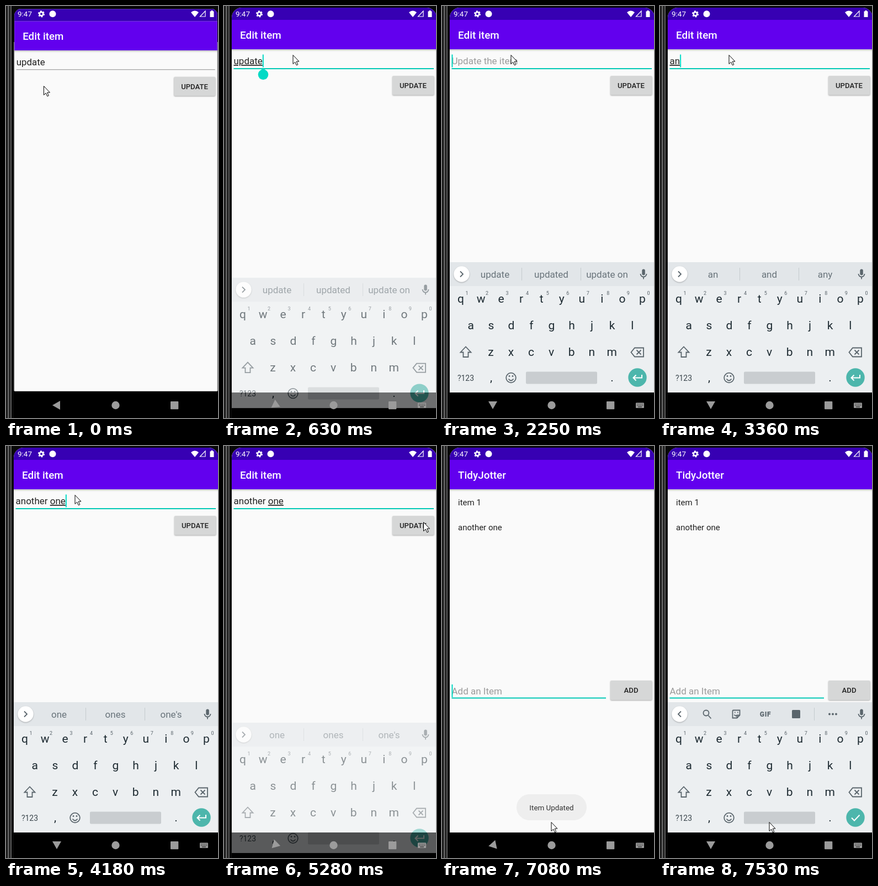
An HTML page that plays this animation: 384 by 743 pixels, repeating every 7.99 s.

```html
<!DOCTYPE html>
<html lang="en">
<head>
<meta charset="utf-8">
<title>Editing a list item</title>
<style>
html, body { margin: 0; width: 100%; height: 100%; overflow: hidden; background: #080808; }
svg { display: block; width: 384px; height: 743px; }
text { font-family: Roboto, "Noto Sans", sans-serif; white-space: pre; }
.title { font-size: 18.9px; font-weight: 500; fill: #fff; }
.field { font-size: 17px; fill: #222; }
.hint { font-size: 17px; fill: #9b9b9b; }
.row { font-size: 15px; fill: #222; }
.label { font-size: 13.2px; font-weight: 500; fill: #222; text-anchor: middle; }
.toast { font-size: 13.4px; fill: #333; text-anchor: middle; }
.word { font-size: 17px; fill: #68737a; text-anchor: middle; }
.key { font-size: 21px; fill: #1d2a31; text-anchor: middle; }
.digit { font-size: 9px; fill: #59636a; text-anchor: middle; }
.small { font-size: 14px; fill: #3b464d; text-anchor: middle; }
.button { fill: #d6d7d7; filter: drop-shadow(0 1px 1px #0005); }
.line { fill: none; stroke: #5a656c; stroke-width: 1.8; }
.teal { fill: #03dac5; }
#composing { text-decoration: underline; text-decoration-thickness: 1px; }
</style>
</head>
<body>
<svg viewBox="0 0 384 743">
  <defs>
    <clipPath id="glass"><rect x="14" y="3" width="371" height="780" rx="18"/></clipPath>
    <linearGradient id="shade" x2="0" y2="1">
      <stop stop-color="#000" stop-opacity=".22"/><stop offset="1" stop-color="#000" stop-opacity="0"/>
    </linearGradient>
    <g id="window">
      <rect x="14" y="3" width="370" height="694" fill="#fafafa"/>
      <rect x="14" y="78" width="370" height="4" fill="url(#shade)"/>
      <rect x="14" y="25" width="370" height="53" fill="#6200ee"/>
      <rect x="14" y="3" width="370" height="22" fill="#3700b3"/>
    </g>
  </defs>

  <rect width="384" height="743" fill="#080808"/>
  <rect width="2" height="743" fill="#222"/>
  <rect x="3" width="2" height="743" fill="#707070"/>
  <rect x="5" width="3.5" height="743" fill="#262626"/>
  <rect x="8.5" width="1.3" height="743" fill="#7d7d7d"/>

  <g clip-path="url(#glass)">
    <rect x="14" y="3" width="370" height="740" fill="#000"/>
    <rect x="14" y="65" width="370" height="629" fill="#777"/>

    <g id="list">
      <use href="#window"/>
      <text class="title" x="29" y="59">TidyJotter</text>
      <text class="row" x="29" y="106.5">item 1</text>
      <text class="row" id="second" x="29" y="151.5"></text>
      <g id="adder">
        <text class="hint" x="17.5" y="683">Add an Item</text>
        <rect id="addLine" x="17.5" width="279.5"/>
        <rect id="addCaret" class="teal" x="17.5" y="665" width="2" height="23"/>
        <rect class="button" x="305" y="658" width="75.5" height="35" rx="2"/>
        <text class="label" x="342.5" y="680">ADD</text>
      </g>
    </g>

    <g id="edit">
      <use href="#window"/>
      <text class="title" x="29" y="59">Edit item</text>
      <text class="hint" id="editHint" x="17.5" y="105">Update the item</text>
      <text class="field" id="value" x="17.5" y="105"><tspan id="done"></tspan><tspan id="composing"></tspan></text>
      <rect id="editLine" x="17.5" width="362.5"/>
      <rect id="editCaret" class="teal" y="87.5" width="2" height="23"/>
      <path id="handle" class="teal" d="M71 112.5L77.5 117A9.3 9.3 0 1 1 64.5 117Z"/>
      <rect id="update" class="button" x="305" y="126" width="75.5" height="34.5" rx="2"/>
      <text class="label" x="342.5" y="148">UPDATE</text>
    </g>

    <g id="toast">
      <rect x="135" y="628" width="127" height="47" rx="23.5" fill="#eeeeee"/>
      <text class="toast" x="198.5" y="657">Item Updated</text>
    </g>

    <rect x="14" y="697" width="370" height="46" fill="#000"/>

    <g id="keyboard">
      <rect x="14" y="462" width="370" height="235" fill="#eceff1"/>
      <rect x="14" y="462" width="370" height="43" fill="#e2e6e9"/>
      <circle cx="35.5" cy="483.5" r="14.2" fill="#fff" style="filter:drop-shadow(0 1px 1px #0004)"/>
      <path id="chevron" class="line" d="M33 478.5l5 5-5 5"/>
      <g id="words">
        <path d="M144.5 472v23M251.5 472v23" stroke="#c4cacd"/>
        <text class="word" x="96" y="490"></text>
        <text class="word" x="198" y="490"></text>
        <text class="word" x="299" y="490"></text>
      </g>
      <g id="tools">
        <path class="line" d="M87.5 486l5 5.5"/><circle class="line" cx="83.5" cy="481.5" r="5"/>
        <path class="line" d="M133 476.5h11.5v9l-5 5H131.500v-12.500a1.500 1.500 0 0 1 1.500-1.500zM144.500 485.500h-5v5M134.500 484.500q2 3 4.500 1.500M135 480.500h1.500M140 480.500h1.500" stroke-width="1.5"/>
        <text x="191" y="487.500" text-anchor="middle" font-size="12" font-weight="900" fill="#5a656c" letter-spacing=".7">GIF</text>
        <rect x="239" y="476" width="15" height="15" rx="1.500" fill="#5a656c"/>
        <path d="M279.500 472v23" stroke="#c4cacd"/>
        <g fill="#5a656c"><circle cx="307" cy="483.500" r="1.900"/><circle cx="313" cy="483.500" r="1.900"/><circle cx="319" cy="483.500" r="1.900"/></g>
      </g>
      <rect x="362.300" y="474.500" width="5.500" height="11" rx="2.750" fill="#5a656c"/>
      <path class="line" d="M359.500 483a5.500 5.500 0 0 0 11 0M365 488.500v4" stroke-width="1.600"/>
      <g id="keys"></g>
      <path class="line" d="M43 614.500L33.500 624.500H38.500V633H47.500V624.500H52.500Z"/>
      <path class="line" d="M349 616.500H365V632.500H349L342.500 624.500ZM352.500 620.500l8 8M360.500 620.500l-8 8"/>
      <text class="small" x="43" y="675.500">?123</text>
      <text class="key" x="89" y="677" font-size="18">,</text>
      <text class="key" x="308" y="677" font-size="18">.</text>
      <circle class="line" cx="125" cy="670.500" r="8.800"/>
      <path class="line" d="M120.500 672.500q4.500 6 9 0" stroke-width="1.600"/>
      <g fill="#5a656c"><circle cx="122" cy="667.500" r="1.400"/><circle cx="128" cy="667.500" r="1.400"/></g>
      <rect x="152" y="659.500" width="129" height="22" rx="2" fill="#c9cdd0"/>
      <circle cx="354" cy="670" r="16.700" fill="#4db6ac"/>
      <path id="enter" fill="none" stroke="#fff" stroke-width="2"/>
    </g>

    <rect x="14" y="697" width="370" height="46" fill="#000" opacity=".25"/>
    <g fill="#9b9b9b">
      <path id="back" d="M84 720L98 712V728Z"/>
      <circle cx="198.500" cy="720" r="7.200"/>
      <rect x="298" y="713" width="14.300" height="14.300" rx="1"/>
      <g id="switcher">
        <rect x="351" y="715.500" width="15" height="9.500" rx="1"/>
        <path d="M353 718h11.500M353 720.500h11.500" stroke="#111" stroke-dasharray="1.300 1.200"/>
        <path d="M355 723h7" stroke="#111"/>
      </g>
    </g>

    <text x="21" y="19" font-size="13.500" fill="#fff">9:47</text>
    <circle cx="64" cy="14.300" r="3.300" fill="none" stroke="#fff" stroke-width="2.600"/>
    <circle cx="64" cy="14.300" r="5.100" fill="none" stroke="#fff" stroke-width="2" stroke-dasharray="2.670"/>
    <circle cx="84.500" cy="14.300" r="6" fill="#fff"/>
    <path d="M335 11.500Q342 5.500 349 11.500L342 20Z" fill="#fff"/>
    <path d="M361 9V19H351.500Z" fill="none" stroke="#fff" stroke-width="1.200"/>
    <path d="M369.500 9.500h2v-1.500h3v1.500h2V20h-7Z" fill="#fff"/>
  </g>

  <path id="pointer" d="M.5 .5V16.500L4.200 13 6.800 18.800 9.300 17.700 6.700 12H11.500Z" fill="#fff" stroke="#000"/>
</svg>
<script>
const LOOP = 7990;
const $ = id => document.getElementById(id);
const set = (id, name, value) => $(id).setAttribute(name, value);
const show = (id, on) => { $(id).style.display = on ? '' : 'none'; };

const bursts = [[0, 810], [1090, 1090], [1270, 1270], [1550, 1820], [2100, 2190], [2250, 2250],
  [2800, 2800], [3270, 3720], [4000, 4180], [4740, 4920], [5100, 7530]];
function snap(t) {
  const [from, to] = bursts.findLast(b => b[0] <= t);
  return Math.min(to, from + Math.floor((t - from) / 90) * 90);
}

// Piecewise linear value through [time, value] points.
function track(t, points) {
  const i = points.findIndex(p => p[0] > t);
  if (i < 0) return points.at(-1)[1];
  if (i === 0) return points[0][1];
  const [[t0, a], [t1, b]] = [points[i - 1], points[i]];
  return a + (b - a) * (t - t0) / (t1 - t0);
}

// Time, finished text, word being composed, suggestions.
const base = 'update,updated,update on';
const typing = [
  [0, 'update', '', base], [450, '', 'update', base], [1640, '', 'updat', base],
  [2100, '', 'upd', base], [2190, '', 'u', base], [2250, '', '', base],
  [3270, '', 'a', 'a,and,at'], [3360, '', 'an', 'an,and,any'], [3450, '', 'anot', 'anot,another,not'],
  [3540, '', 'anoth', 'anoth,another,north'], [3630, '', 'another', 'another,others,other'],
  [3720, 'another ', '', 'one,person,day'], [4000, 'another ', 'o', 'o,of,on'],
  [4090, 'another ', 'on', 'on,one,only'], [4180, 'another ', 'one', "one,ones,one's"]
];

const mouseX = [[0, 68], [90, 72], [360, 124.500], [4740, 124.500], [4830, 250], [4920, 361], [5280, 361],
  [5460, 310], [5730, 226.500], [5820, 228], [6090, 232], [6450, 208], [6630, 197.500]];
const mouseY = [[0, 144], [90, 138], [360, 88], [4740, 88], [4830, 110], [4920, 137], [5280, 137],
  [5460, 190], [5730, 258.500], [5820, 240], [5910, 225], [6090, 320], [6450, 610], [6630, 678]];
const keyboardIn = [[450, 0], [540, .3], [630, .62], [720, .9], [810, 1], [5190, 1], [5370, 0],
  [7080, 0], [7170, .3], [7260, .65], [7350, .9], [7440, 1]];
const backTurn = [[540, 0], [630, -35], [720, -75], [810, -90], [5190, -90], [5370, 0],
  [6990, 0], [7080, -12], [7170, -35], [7260, -75], [7350, -90]];
const editScale = [[0, .9932], [90, 1], [5280, 1], [5550, .92]];
const editAlpha = [[5280, 1], [5550, 0]];
const listScale = [[5280, 1.060], [5640, 1]];
const toastAlpha = [[5370, 0], [5640, 1], [7080, 1], [7350, 0]];

const within = (t, ...spans) => spans.some(([a, b]) => t >= a && t < b);
const scaled = k => `translate(199 371) scale(${k}) translate(-199 -371)`;

function underline(id, y, focused) {
  set(id, 'y', focused ? y - .5 : y);
  set(id, 'height', focused ? 2 : 1);
  set(id, 'fill', focused ? '#03c9b6' : '#8c8c8c');
}

function buildKeys() {
  const text = (kind, x, y, s) => `<text class="${kind}" x="${x}" y="${y}">${s}</text>`;
  const rows = [['qwertyuiop', 34, 535], ['asdfghjkl', 52.300, 583], ['zxcvbnm', 88.500, 630.500]];
  $('keys').innerHTML = rows.map(([letters, x0, y], r) => [...letters].map((c, i) => {
    const x = x0 + i * 36.550;
    return text('key', x, y, c) + (r ? '' : text('digit', x + 11, 520.500, (i + 1) % 10));
  }).join('')).join('');
}

function drawEdit(t) {
  const [, done, word, hints] = typing.findLast(s => s[0] <= t);
  $('done').textContent = done;
  $('composing').textContent = word;
  show('editHint', !(done + word));
  const width = done + word ? $('value').getComputedTextLength() : 0;
  set('editCaret', 'x', 17.500 + width);
  show('editCaret', within(t, [450, 1090], [1550, 2800], [3270, 4740]));
  show('handle', within(t, [450, 1640]));
  underline('editLine', 112.500, t >= 450);
  $('update').style.fill = within(t, [5100, 5280]) ? '#bcbdbd' : '';
  set('edit', 'transform', scaled(track(t, editScale)));
  set('edit', 'opacity', track(t, editAlpha));
  show('edit', t < 5550);
  document.querySelectorAll('.word').forEach((el, i) => { el.textContent = hints.split(',')[i]; });
}

function drawList(t) {
  show('list', t >= 5280);
  set('list', 'transform', scaled(track(t, listScale)));
  $('second').textContent = 'another one';
  underline('addLine', 689, t >= 6810);
  show('addCaret', within(t, [6810, 7530]));
  set('adder', 'transform', `translate(0 ${t >= 6990 ? -235 : 0})`);
  set('toast', 'opacity', track(t, toastAlpha));
}

function drawSystem(t) {
  const shown = track(t, keyboardIn), adding = t > 6000;
  set('keyboard', 'opacity', shown);
  set('keyboard', 'transform', `translate(0 ${(1 - shown) * 74})`);
  show('words', !adding);
  show('tools', adding);
  set('chevron', 'transform', adding ? 'translate(71 0) scale(-1 1)' : '');
  set('enter', 'd', adding ? 'M347 670.500l5 5 9.500-10' : 'M362 665v5.500H347M351.500 665.500l-5 5 5 5');
  const turn = track(t, backTurn);
  set('back', 'transform', `rotate(${turn} 91.500 719.500)`);
  set('switcher', 'opacity', turn ? 1 : 0);
  set('pointer', 'transform', `translate(${track(t, mouseX)} ${track(t, mouseY)})`);
}

function frame(now) {
  const t = snap(Math.max(0, now - start) % LOOP);
  drawEdit(t);
  drawList(t);
  drawSystem(t);
  requestAnimationFrame(frame);
}

buildKeys();
const start = performance.now();
frame(start);
</script>
</body>
</html>
```
